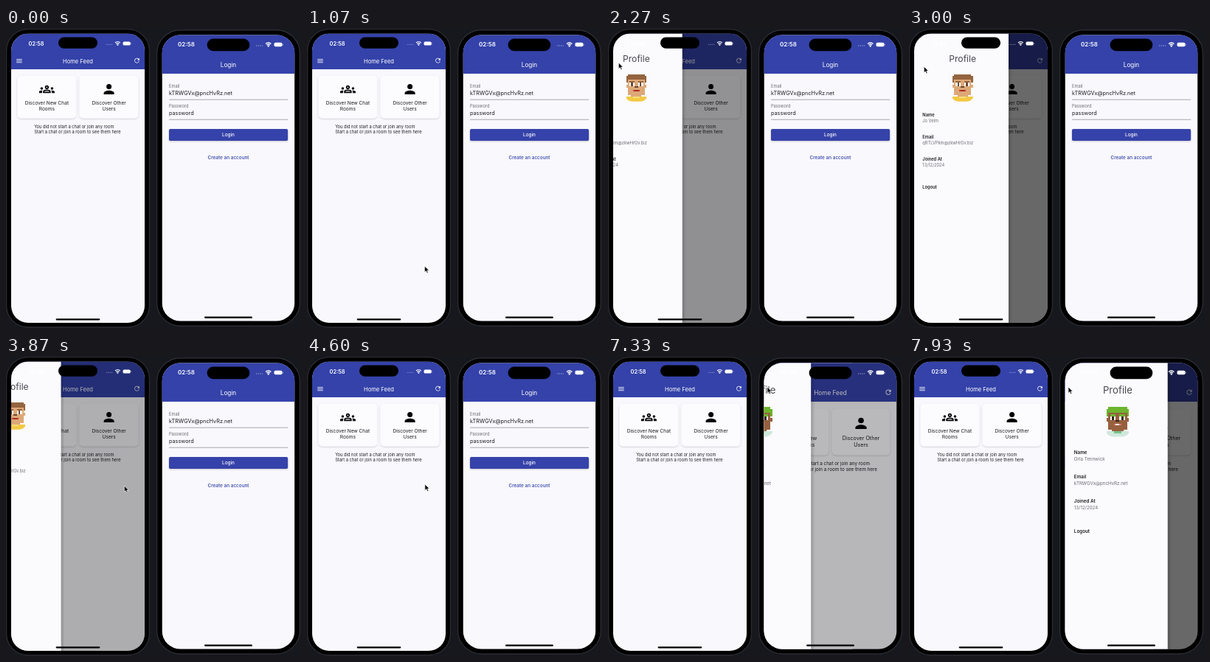
Write an HTML page that moves like this. It is 400 by 407 pixels and loops after 8000 ms.

```html
<!DOCTYPE html>
<html lang="en">
<head>
<meta charset="utf-8">
<title>Chat app</title>
<style>
html, body { margin: 0; width: 100%; height: 100%; overflow: hidden; background: #17181d; }
svg { display: block; width: 100vw; height: 100vh; font-family: Inter, "Open Sans", sans-serif; }
</style>
</head>
<body>
<svg id="stage" viewBox="0 0 400 407"></svg>
<script>
const LOOP = 8000;
const BLUE = '#3442a9', PAPER = '#f9f8fc', INK = '#1d1d21', GREY = '#6c6c72';
const DRAWER = 304, BAR = 115, SCRIM = 0.58;

// Both screens use device units; s maps them to the stage.
const left = {
  id: 'l', x: 7, y: 7.6, s: 0.421, w: 430, h: 932, inset: 81, barY: 32, listY: -5,
  card: ['Discover New Chat', 'Rooms'],
  user: { name: 'Jo Velm', email: 'qRTLVPkm@zkwHrGv.biz' },
  face: { hair: '#94643f', skin: '#dda877', eye: '#6b4a34', mouth: '#c8382f', teeth: '#a92d28', shirt: '#f3c944', trim: '#f7dc7c' }
};
const right = {
  id: 'r', x: 211.5, y: 9.3, s: 0.458, w: 393, h: 848, inset: 72, barY: 29, listY: 0,
  card: ['Discover New', 'Chat Rooms'],
  user: { name: 'Orla Tennwick', email: 'kTRWGVx@pncHvRz.net' },
  face: { hair: '#6cb52d', skin: '#96603f', eye: '#35251c', mouth: '#e0796f', teeth: '#fff', shirt: '#cfe8dc', trim: '#79c28a' }
};

const rect = (x, y, w, h, fill, more = '') =>
  `<rect x="${x}" y="${y}" width="${w}" height="${h}" fill="${fill}" ${more}/>`;

function text(str, x, y, size, fill = INK, anchor = 'start', weight = 400) {
  return `<text x="${x}" y="${y + size * 0.36}" font-size="${size}" fill="${fill}" ` +
    `text-anchor="${anchor}" font-weight="${weight}">${str}</text>`;
}

const icon = (cx, cy, size, body) =>
  `<g transform="translate(${cx - size / 2} ${cy - size / 2}) scale(${size / 24})">${body}</g>`;

const MENU = '<path d="M3 7h18M3 12h18M3 17h18" stroke="#fff" stroke-width="2"/>';
const REFRESH = '<path fill="#fff" d="M17.65 6.35A8 8 0 1 0 19.73 14h-2.08A6 6 0 1 1 16.22 7.78L13 11h7V4z"/>';
const PERSON = '<circle cx="12" cy="8" r="4"/><path d="M12 14c-2.67 0-8 1.34-8 4v2h16v-2c0-2.66-5.33-4-8-4z"/>';
const SIDE = '<circle cx="4" cy="11" r="2"/><path d="M5.13 14.1C3.7 13.9 2.3 14.1 1.2 14.6.5 14.9 0 15.6 0 16.4V18h4.5v-1.6q0-1.2.63-2.3z"/>';
const GROUP = SIDE + `<g transform="matrix(-1 0 0 1 24 0)">${SIDE}</g>` +
  '<g fill="none" stroke="#000" stroke-width="2"><circle cx="12" cy="9" r="2"/>' +
  '<path d="M7 17v-.6c0-1.6 2.6-2.65 5-2.65s5 1.05 5 2.65v.6z"/></g>';

function card(x, w, glyph, lines) {
  const mid = x + w / 2;
  return rect(x, 135, w, 138, '#fcfbfe', 'rx="12" filter="url(#lift)"') +
    icon(mid, 179, 50, glyph) +
    lines.map((line, i) => text(line, mid, 224 + i * 19, 15.6, INK, 'middle')).join('');
}

function appBar(p, title) {
  return rect(0, 0, p.w, BAR, BLUE) + text(title, p.w / 2, 88.7, 18, '#fff', 'middle');
}

function home(p) {
  const w = (p.w - 50) / 2, textX = p.w / 2 - 141;
  return rect(0, 0, p.w, p.h, PAPER) + appBar(p, 'Home Feed') +
    `<circle id="${p.id}-hover" cx="26" cy="88" r="20" fill="#fff" opacity="0"/>` +
    icon(26, 88, 24, MENU) + icon(p.w - 25, 87, 24, REFRESH) +
    card(20, w, GROUP, p.card) + card(30 + w, w, PERSON, ['Discover Other', 'Users']) +
    text('You did not start a chat or join any room', textX, 299, 13.7) +
    text('Start a chat or join a room to see them here', textX, 316, 13.7);
}

function field(label, value, y) {
  return text(label, 20.7, y, 12.5, GREY) + text(value, 20.7, y + 20, 16) +
    rect(20.7, y + 39, 352, 1.6, '#8b8b90');
}

function login(p) {
  const mid = p.w / 2;
  return rect(0, 0, p.w, p.h, PAPER) + appBar(p, 'Login') +
    field('Email', p.user.email, 152) + field('Password', 'password', 211) +
    rect(20.7, 279, 352, 35, BLUE, 'rx="4" filter="url(#lift)"') +
    '<clipPath id="button"><rect x="20.7" y="279" width="352" height="35" rx="4"/></clipPath>' +
    '<circle id="ripple" cx="206" cy="298" r="0" fill="#fff" opacity=".12" clip-path="url(#button)"/>' +
    text('Login', mid, 296, 14, '#fff', 'middle', 500) +
    text('Create an account', mid, 363, 14, BLUE, 'middle', 500);
}

// Blocky portrait on a 16 x 16 grid, rounded at the bottom.
function avatar(p) {
  const f = p.face, u = 5.5;
  const cells = [
    [3, 2, 10, 10, f.skin], [2, 6, 12, 2, f.skin], [5, 12, 6, 2, f.skin],
    [3, 0, 10, 3, f.hair], [2, 1, 1, 4, f.hair], [13, 1, 1, 4, f.hair],
    [4, 4, 3, 1, f.hair], [9, 4, 3, 1, f.hair],
    [4, 5, 3, 2, '#fff'], [9, 5, 3, 2, '#fff'], [5, 5, 1, 2, f.eye], [10, 5, 1, 2, f.eye],
    [7, 7, 2, 1, f.eye], [6, 9, 4, 1, f.mouth], [7, 9, 2, 1, f.teeth],
    [2, 13, 12, 3, f.shirt], [6, 13, 4, 1, f.trim]
  ];
  return `<g clip-path="url(#round)"><g transform="translate(112 131) scale(${u})" shape-rendering="crispEdges">` +
    cells.map(c => rect(...c)).join('') + '</g></g>';
}

function drawer(p) {
  const rows = [['Name', p.user.name], ['Email', p.user.email], ['Joined At', '13/12/2024'], ['Logout', '']];
  const list = rows.map(([key, value], i) => {
    const y = 266 + p.listY + i * 72 + (i === 3 ? 17 : 0);
    return text(key, 27, y, 13.7, INK, 'start', 600) + (value && text(value, 27, y + 19.5, 13.5, GREY));
  }).join('');
  return rect(DRAWER, 0, 12, p.h, 'url(#edge)') + rect(0, 0, DRAWER, p.h, '#fbfafd') +
    text('Profile', 156, 81, 28.8, '#4b4b50', 'middle') + avatar(p) + list;
}

function status(p) {
  const x = p.w - p.inset, y = p.barY;
  const dots = [0, 1, 2, 3].map(i => `<circle cx="${x - 41 + i * 5.5}" cy="${y + 3}" r="1.5" fill="#fff" opacity=".5"/>`).join('');
  return text('02:58', p.inset, y, 17.5, '#fff', 'middle', 600) + dots +
    `<g transform="translate(${x - 6} ${y})" fill="none" stroke="#fff" stroke-width="3">` +
    '<path d="M-8 -2.5a11.5 11.5 0 0 1 16 0M-4.8 1.4a7 7 0 0 1 9.6 0"/><circle cy="4.5" r="1"/></g>' +
    rect(x + 11, y - 6, 24, 12, '#fff', 'rx="4"') + rect(x + 36, y - 2, 1.6, 4, '#fff', 'opacity=".6"') +
    rect(p.w / 2 - 63, 11.5, 126, 36.5, '#000', 'rx="18.2"') +
    rect(p.w / 2 - 71, p.h - 13.5, 142, 5, '#000', 'rx="2.5"');
}

function phone(p) {
  const page = (name, body) => `<g id="${p.id}-${name}">${body}</g>`;
  return `<g transform="translate(${p.x} ${p.y}) scale(${p.s})">` +
    rect(-15, -14, p.w + 30, p.h + 28, '#000', 'rx="69" stroke="#303138" stroke-width="2.5"') +
    `<clipPath id="${p.id}-screen">${rect(0, 0, p.w, p.h, '#000', 'rx="55"')}</clipPath>` +
    `<g clip-path="url(#${p.id}-screen)">` +
    (p === right ? page('login', login(p)) : '') + page('home', home(p)) +
    rect(0, 0, p.w, p.h, '#000', `id="${p.id}-scrim" opacity="0"`) +
    page('drawer', drawer(p)) + status(p) + '</g></g>';
}

const stage = document.getElementById('stage');
stage.innerHTML = `<defs>
  <filter id="lift" x="-10%" y="-10%" width="120%" height="140%">
    <feDropShadow dx="0" dy="2" stdDeviation="2.5" flood-color="#000" flood-opacity=".2"/>
  </filter>
  <linearGradient id="edge">
    <stop offset="0" stop-opacity=".18"/><stop offset="1" stop-opacity="0"/>
  </linearGradient>
  <clipPath id="round"><rect x="118" y="90" width="76" height="129" rx="26"/></clipPath>
</defs>` + rect(0, 0, 400, 407, '#17181d') + phone(left) + phone(right) +
  '<path id="cursor" d="M0 0v8.4l2-1.8 1.3 3 1.5-.7-1.3-2.9h2.6z" fill="#000" stroke="#fff" stroke-width=".7"/>';

const el = id => document.getElementById(id);
const clamp = v => Math.min(1, Math.max(0, v));

// Critically damped fling, ms since release; snaps when close to rest.
function fling(ms) {
  if (ms <= 0) return 0;
  const t = ms / 1000;
  const rest = (1 + 21.4 * t) * Math.exp(-22.4 * t);
  return rest < 0.002 ? 1 : 1 - rest;
}

// Fast start, long settle: cubic-bezier(.18, 1, .04, 1).
function settle(x) {
  let lo = 0, hi = 1;
  for (let i = 0; i < 24; i++) {
    const u = (lo + hi) / 2, v = 1 - u;
    if (3 * v * v * u * 0.18 + 3 * v * u * u * 0.04 + u * u * u < x) lo = u; else hi = u;
  }
  return 1 - (1 - lo) ** 3;
}

// Pointer stops: time, x, y.
const path = [
  [730, 200, 408], [1530, 96, 190], [1600, 96, 190], [2070, 14.3, 47], [2900, 14.3, 47],
  [3730, 160.3, 176], [4560, 160.3, 176], [5000, 142, 94], [5290, 142, 94],
  [5530, 306, 152], [5900, 306, 152], [6060, 306, 145], [6690, 306, 145],
  [7130, 216, 42], [LOOP, 216, 42]
];

function pointer(t) {
  const i = path.findIndex(stop => stop[0] > t);
  if (i <= 0) return [0, 450];
  const [t0, x0, y0] = path[i - 1], [t1, x1, y1] = path[i];
  const k = (t - t0) / (t1 - t0), e = k * k * (3 - 2 * k);
  return [x0 + (x1 - x0) * e, y0 + (y1 - y0) * e];
}

const shift = (id, x, y = 0) => el(id).setAttribute('transform', `translate(${x} ${y})`);

function setDrawer(p, open) {
  shift(p.id + '-drawer', open > 0 ? (open - 1) * DRAWER : -DRAWER - 40);
  el(p.id + '-scrim').setAttribute('opacity', SCRIM * open);
}

function draw(t) {
  setDrawer(left, t < 3802 ? fling(t - 2157) : 1 - fling(t - 3802));
  setDrawer(right, fling(t - 7264));

  const push = settle(clamp((t - 6170) / 500));
  shift('r-login', -push * right.w / 3);
  shift('r-home', (1 - push) * right.w);
  el('ripple').setAttribute('r', Math.max(0, t - 6060) * 1.05);

  el('l-hover').setAttribute('opacity', t > 2050 && t < 2950 ? 0.1 : 0);
  el('r-hover').setAttribute('opacity', t > 7110 ? 0.1 : 0);
  shift('cursor', ...pointer(t));
}

const start = performance.now();
function tick() {
  draw((performance.now() - start) % LOOP);
  requestAnimationFrame(tick);
}
tick();
</script>
</body>
</html>
```
